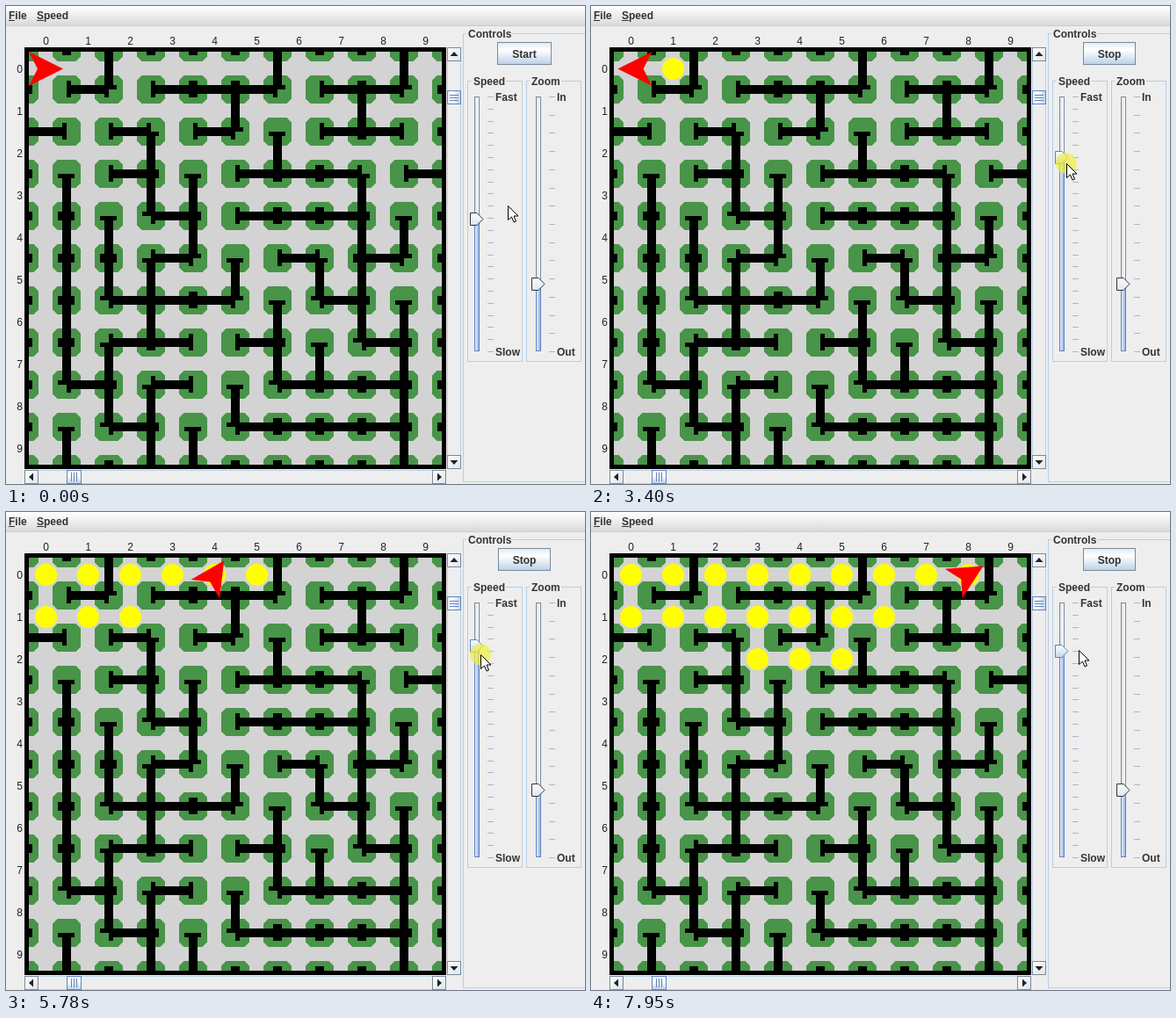
An HTML page with a canvas that plays this animation: 659x544 px, repeating every 8000 ms.

```html
<!DOCTYPE html>
<html lang="en">
<head>
<meta charset="utf-8">
<title>Maze walker</title>
<style>
  html, body { margin: 0; width: 100%; height: 100%; overflow: hidden; background: #eee; }
  canvas { display: block; }
</style>
</head>
<body>
<canvas id="stage" width="659" height="544"></canvas>
<script>
const LOOP = 8000, TICK = 70, W = 659, H = 544, CELL = 48, SIZE = 10;
const FONT = '12px "Liberation Sans", Arial, sans-serif';
const LINE = '#7a8a99', PALE = '#b8cfe5', BLUE = '#6382bf';
const STARTED = 920, GRAB = 2250, RELEASE = 7000;

// Two characters per cell: "_" is a wall below, "|" a wall on the right
const MAZE = [
  '.._|.._._._|.._._|.|',
  '_..._..._|...._|_..|',
  '...._|...._|_._..._|',
  '.|...|_|.._._._|...|',
  '.|.|.._|...._..|_|.|',
  '.|.|_|_._|...|_|...|',
  '.|.._|_..._|...|_|.|',
  '.|_|.._....|_|_._|.|',
  '...|_|...|_._._._|.|',
  '_|_._|_|_._._._._|_|'];
const wallBelow = (x, y) => y < 0 || MAZE[y][2 * x] === '_';
const wallRight = (x, y) => x < 0 || MAZE[y][2 * x + 1] === '|';

// Headings run counter-clockwise from east
const HEADINGS = [[1, 0], [0, -1], [-1, 0], [0, 1]];

// Key points: [time, actions done] and [time, x, y]
const PACE = [[915, 0], [1390, 3.5], [1780, 5], [2570, 8], [3340, 14.8], [4240, 31.39],
  [5780, 62.63], [6690, 109.5], [7110, 122.4], [7950, 144.34]];
const MOUSE = [[0, 571, 227], [680, 584, 57], [900, 584, 57], [1390, 558, 257], [GRAB, 537, 239],
  [2570, 537, 214], [3300, 541, 179], [5200, 541, 179], [5780, 540, 162], [5850, 540, 153],
  [6760, 539, 153], [6950, 538, 167], [7600, 538, 167], [7950, 555, 157]];

const ctx = document.getElementById('stage').getContext('2d');
const backdrop = document.createElement('canvas');
backdrop.width = W;
backdrop.height = H;

const clamp = (v, lo, hi) => Math.min(hi, Math.max(lo, v));

function at(points, t) {
  t = clamp(t, points[0][0], points[points.length - 1][0]);
  const i = Math.max(1, points.findIndex(p => p[0] >= t));
  const a = points[i - 1], b = points[i], p = (t - a[0]) / (b[0] - a[0]);
  return a.slice(1).map((v, k) => v + (b[k + 1] - v) * p);
}

// Depth-first search that tries left, ahead and right; a right turn is three left turns
function planWalk() {
  const plan = [], seen = new Set();
  let x = 0, y = 0, dir = 0;
  const turn = n => {
    for (; n > 0; n--) plan.push('turn');
    dir = plan.filter(a => a === 'turn').length % 4;
  };
  const move = () => {
    plan.push('move');
    x += HEADINGS[dir][0];
    y += HEADINGS[dir][1];
  };
  const blocked = () => [
    () => wallRight(x, y), () => wallBelow(x, y - 1),
    () => wallRight(x - 1, y), () => wallBelow(x, y)][dir]();
  const tryAhead = () => {
    const [dx, dy] = HEADINGS[dir];
    if (blocked() || seen.has([x + dx, y + dy].join())) return;
    move();
    explore();
    turn(2);
    move();
    turn(2);
  };
  const explore = () => {
    seen.add([x, y].join());
    for (const lefts of [1, 3, 3]) {
      turn(lefts);
      tryAhead();
    }
    turn(1);
  };
  explore();
  return plan;
}

function walk(plan, done) {
  const balls = [];
  let x = 0, y = 0, lefts = 0;
  for (let k = 0; k < done; k++) {
    const p = Math.min(1, done - k);
    if (plan[k] === 'turn') { lefts += p; continue; }
    const [dx, dy] = HEADINGS[lefts % 4];
    x += dx * p;
    y += dy * p;
    if (p === 1) balls.push([x, y]);
  }
  return { x, y, balls, angle: -lefts * Math.PI / 2 };
}

function box(g, x, y, w, h, fill, stroke) {
  if (fill) { g.fillStyle = fill; g.fillRect(x, y, w, h); }
  if (stroke) { g.strokeStyle = stroke; g.lineWidth = 1; g.strokeRect(x + .5, y + .5, w - 1, h - 1); }
}

function shape(g, x, y, points, fill, stroke) {
  g.beginPath();
  points.forEach(([dx, dy]) => g.lineTo(x + dx, y + dy));
  g.closePath();
  if (fill) { g.fillStyle = fill; g.fill(); }
  if (stroke) { g.strokeStyle = stroke; g.lineWidth = 1; g.stroke(); }
}

function disc(g, x, y, r, fill) {
  g.fillStyle = fill;
  g.beginPath();
  g.arc(x, y, r, 0, 7);
  g.fill();
}

function text(g, str, x, y, { bold = true, align = 'left', color = '#333' } = {}) {
  g.font = (bold ? 'bold ' : '') + FONT;
  g.fontKerning = 'none';
  g.textAlign = align;
  g.fillStyle = color;
  g.fillText(str, x, y);
}

function blend(g, x0, y0, x1, y1, ...colors) {
  const grad = g.createLinearGradient(x0, y0, x1, y1);
  colors.forEach((c, i) => grad.addColorStop(i / (colors.length - 1), c));
  return grad;
}

const glossy = (g, x0, y0, x1, y1) => blend(g, x0, y0, x1, y1, '#dde8f3', '#fff', '#dde8f3', PALE);
const postX = i => 69 + CELL * i;
const postY = j => 95 + CELL * j;

function clipMaze(g) {
  g.beginPath();
  g.rect(21, 47, CELL * SIZE, CELL * SIZE);
  g.clip();
}

// A wall is a bar with a short cross piece at both ends
function drawWall(g, x, y, across) {
  const bar = (along, from, length, width) => across
    ? box(g, x + along, y + from, length, width, '#000')
    : box(g, x + from, y + along, width, length, '#000');
  bar(0, -5, CELL, 10);
  bar(0, -10, 5, 19);
  bar(CELL - 5, -10, 5, 19);
}

function drawMaze(g) {
  const a = 16, b = 10.5;
  const octagon = [[-a, -b], [-b, -a], [b, -a], [a, -b], [a, b], [b, a], [-b, a], [-a, b]];
  g.save();
  clipMaze(g);
  box(g, 21, 47, CELL * SIZE, CELL * SIZE, '#d3d3d3');
  for (let i = -1; i < SIZE; i++)
    for (let j = -1; j < SIZE; j++) shape(g, postX(i), postY(j), octagon, '#489448');
  for (let i = -1; i < SIZE; i++) for (let j = -1; j < SIZE; j++) {
    if (i >= 0 && wallBelow(i, j)) drawWall(g, postX(i - 1), postY(j), true);
    if (j >= 0 && wallRight(i, j)) drawWall(g, postX(i), postY(j - 1), false);
  }
  g.restore();
  const style = { bold: false, align: 'center', color: '#222' };
  for (let k = 0; k < SIZE; k++) {
    text(g, k, 45.5 + CELL * k, 44, style);
    text(g, k, 15.5, 76 + CELL * k, style);
  }
}

function drawArrowButton(g, x, y, angle) {
  box(g, x, y, 16, 16, blend(g, x, y, x + 16, y + 16, '#fff', '#dde4ec'), LINE);
  g.save();
  g.translate(x + 8, y + 8);
  g.rotate(angle);
  shape(g, 0, 0, [[-2, -4.5], [-2, 4.5], [3, 0]], '#222');
  g.restore();
}

function drawScrollbars(g) {
  box(g, 502, 47, 16, 480, '#eee', PALE);
  box(g, 21, 528, 480, 16, '#eee', PALE);
  drawArrowButton(g, 502, 47, -Math.PI / 2);
  drawArrowButton(g, 502, 511, Math.PI / 2);
  drawArrowButton(g, 21, 528, Math.PI);
  drawArrowButton(g, 485, 528, 0);
  box(g, 502, 96, 16, 16, glossy(g, 502, 0, 518, 0), BLUE);
  box(g, 69, 528, 17, 16, glossy(g, 0, 528, 0, 544), BLUE);
  for (let k = 0; k < 3; k++) {
    box(g, 505, 101 + 3 * k, 10, 1, BLUE);
    box(g, 74 + 3 * k, 531, 1, 10, BLUE);
  }
}

function titled(g, title, x, y, w, h, textX, textW) {
  box(g, x, y, w, h, null, PALE);
  box(g, textX - 2, y, textW + 4, 1, '#eee');
  text(g, title, textX, y + 5);
}

function drawScale(g, x, count, top, bottom) {
  for (let k = 0; k <= count; k++) box(g, x, Math.round(103 + 290 * k / count), 7, 1, '#a3b8cc');
  text(g, top, x + 9, 108);
  text(g, bottom, x + 9, 398);
}

function drawSlider(g, x, y, focused) {
  box(g, x, 103, 6, 290, blend(g, x, 0, x + 6, 0, '#d8dde3', '#fff'), LINE);
  box(g, x, y, 6, 393 - y, blend(g, x, 0, x + 6, 0, '#fff', '#7ea4e0'), BLUE);
  const fill = blend(g, 0, y - 7, 0, y + 7, '#fff', focused ? '#c5d8ec' : '#dde6ef');
  shape(g, x, y + .5, [[-4.5, -7], [3, -7], [10, 0], [3, 7], [-4.5, 7]],
    fill, focused ? BLUE : '#333');
}

function drawBackdrop(g) {
  box(g, 0, 0, W, H, '#eee');
  box(g, 0, 0, W, 22, blend(g, 0, 0, 0, 22, '#fff', '#dadada'));
  box(g, 0, 22, W, 1, '#ccc');
  text(g, 'File', 3, 15);
  text(g, 'Speed', 35, 15);
  box(g, 3, 16, 7, 1, '#333');
  box(g, 35, 16, 8, 1, '#333');
  drawMaze(g);
  drawScrollbars(g);
  titled(g, 'Controls', 520, 31, 140, 511, 526, 48);
  titled(g, 'Speed', 525, 85, 63, 320, 532, 35);
  titled(g, 'Zoom', 592, 85, 63, 320, 598, 32);
  drawScale(g, 548, 21, 'Fast', 'Slow');
  drawScale(g, 618, 14, 'In', 'Out');
  drawSlider(g, 603, 316, false);
}

function drawButton(g, t) {
  const started = t >= STARTED, pressed = !started && t > STARTED - 100;
  const w = started ? 60 : 62;
  box(g, 590 - w / 2, 41, w, 26, pressed ? PALE : glossy(g, 0, 41, 0, 67), LINE);
  text(g, started ? 'Stop' : 'Start', 590, 59, { align: 'center' });
  if (started && t < GRAB) box(g, 575, 45, 30, 19, null, '#a3b8cc');
}

function drawWalker(g, t) {
  const { x, y, balls, angle } = walk(plan, at(PACE, t)[0]);
  g.save();
  clipMaze(g);
  g.translate(45.5, 71.5);
  for (const [i, j] of balls) disc(g, CELL * i, CELL * j, 12.5, '#ff0');
  g.translate(CELL * x, CELL * y);
  g.rotate(angle);
  shape(g, 0, 0, [[19.5, 0], [-19.5, -19.5], [-9.6, 0], [-19.5, 19.5]], '#f00');
  g.restore();
}

// The thumb runs slightly ahead of the dragging pointer
function thumbY(t) {
  const mouseY = at(MOUSE, clamp(t, GRAB, RELEASE))[1];
  return Math.round(172 + 1.17 * (mouseY - 179));
}

function drawMouse(g, t) {
  const [x, y] = at(MOUSE, t).map(Math.round);
  const held = (from, to) => t >= from && t < to;
  if (held(800, STARTED) || held(GRAB, 3450) || held(5150, RELEASE))
    disc(g, x, y, 12, 'rgba(242,240,60,.7)');
  shape(g, x + .5, y + .5,
    [[0, 0], [0, 16], [4, 12.5], [6.5, 18.5], [9, 17.5], [6.5, 11.5], [11.5, 11.5]],
    '#fff', '#000');
}

function frame() {
  const now = performance.now() % LOOP, phase = 40;
  const t = Math.max(0, Math.floor((now - phase) / TICK) * TICK + phase);
  ctx.drawImage(backdrop, 0, 0);
  drawWalker(ctx, t);
  drawButton(ctx, t);
  drawSlider(ctx, 533, thumbY(t), t >= GRAB);
  drawMouse(ctx, t);
  requestAnimationFrame(frame);
}

const plan = planWalk();
drawBackdrop(backdrop.getContext('2d'));
frame();
</script>
</body>
</html>
```
